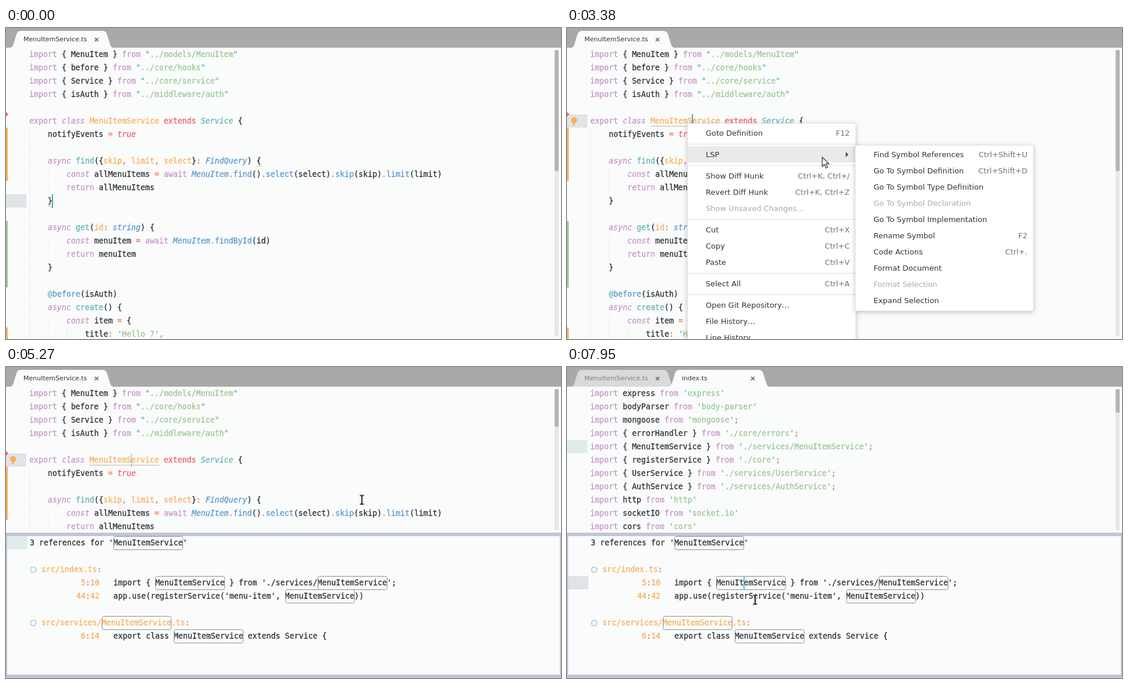
Write an HTML page that moves like this. It is 956 px wide and 537 px high and loops after 8000 ms.

```html
<!DOCTYPE html>
<html lang="en">
<head>
<meta charset="utf-8">
<title>Find symbol references</title>
<style>
  html, body { margin: 0; width: 100%; height: 100%; overflow: hidden; background: #fafbfb; }
  svg { display: block; width: 100%; height: 100%; }
  text { white-space: pre; }
  .code text { font: 13.288px "DejaVu Sans Mono", "Liberation Mono", monospace; font-variant-ligatures: none; stroke-width: .28px; }
  .ui text { font: 13px "DejaVu Sans", sans-serif; fill: #333; }
  .ui .tab { font-size: 11px; }
  .ui .key { fill: #727272; text-anchor: end; }
  .ui .off { fill: #aaa; }
  .menu { filter: drop-shadow(0 2px 4px rgba(0, 0, 0, .22)); }
  .guide { stroke: #d3d6d6; stroke-dasharray: 1 2; }
  .match { fill: none; stroke: #8e8e8e; }
</style>
</head>
<body>
<svg id="stage" viewBox="0 0 956 537"></svg>
<script>
const LOOP = 8000, ROW = 23, BG = '#fafbfb';
const GREY = '#e0e4e7', TINT = '#e0eceb', ORANGE = '#f9ae58';

// Lower-case keys are upright, upper-case keys are italic.
const COLORS = {
  d: '#2b2f33', p: '#c695c6', g: '#99c794', t: '#5fb4b4', b: '#5a98d0',
  o: ORANGE, r: '#ec5f66', e: '#f97b58', c: '#c98465'
};

const imports = (names, path, q, end = '') =>
  `~pimport ~d${names} ~pfrom ~t${q}~g${path}~t${q}~c${end}`;

const serviceCode = [
  imports('{ MenuItem }', '../models/MenuItem', '"'),
  imports('{ before }', '../core/hooks', '"'),
  imports('{ Service }', '../core/service', '"'),
  imports('{ isAuth }', '../middleware/auth', '"'),
  '',
  '~pexport ~Pclass ~oMenuItemService ~rextends ~TService ~d{',
  '    ~dnotifyEvents ~e= ~Rtrue',
  '',
  '    ~Pasync ~tfind~d({~oskip~c, ~olimit~c, ~oselect~d}~c: ~BFindQuery~d) {',
  '        ~Pconst ~dallMenuItems ~e= ~pawait ~BMenuItem~e.~bfind~d()~e.~bselect~d(select)~e.~bskip~d(skip)~e.~blimit~d(limit)',
  '        ~preturn ~dallMenuItems',
  '    ~d}',
  '',
  '    ~Pasync ~tget~d(~oid~c: ~Bstring~d) {',
  '        ~Pconst ~dmenuItem ~e= ~pawait ~BMenuItem~e.~bfindById~d(id)',
  '        ~preturn ~dmenuItem',
  '    ~d}',
  '',
  '    ~t@~bbefore~d(isAuth)',
  '    ~Pasync ~tcreate~d() {',
  '        ~Pconst ~ditem ~e= ~d{',
  "            ~dtitle~c: ~t'~gHello 7~t'~c,"
];

const indexCode = [
  ['express', 'express'], ['bodyParser', 'body-parser'], ['mongoose', 'mongoose', ';'],
  ['{ errorHandler }', './core/errors', ';'],
  ['{ MenuItemService }', './services/MenuItemService', ';'],
  ['{ registerService }', './core', ';'],
  ['{ UserService }', './services/UserService', ';'],
  ['{ AuthService }', './services/AuthService', ';'],
  ['http', 'http'], ['socketIO', 'socket.io'], ['cors', 'cors']
].map(([names, path, end]) => imports(names, path, "'", end));

const rect = (x, y, w, h, fill, extra = '') =>
  `<rect x="${x}" y="${y}" width="${w}" height="${h}" fill="${fill}" ${extra}/>`;
const group = (id, content, cls = '') => `<g id="${id}" class="${cls}">${content}</g>`;

function codeLine(source, x, top) {
  const [lead, ...parts] = source.split(/~(\w)/);
  let spans = '';
  for (let i = 0; i < parts.length; i += 2) {
    const key = parts[i], color = COLORS[key.toLowerCase()];
    const italic = key < 'a' ? ' font-style="italic"' : '';
    spans += `<tspan fill="${color}" stroke="${color}"${italic}>${parts[i + 1]}</tspan>`;
  }
  return `<text x="${x + lead.length * 8}" y="${top + 16}">${spans}</text>`;
}
const codeBlock = lines => lines.map((s, i) => codeLine(s, 40, 34 + i * ROW)).join('');

const guide = (x, y1, y2) => `<path class="guide" d="M${x + .5} ${y1}V${y2}"/>`;
const scrollbar = (id, trackEnd, thumbEnd) => group(id,
  rect(945, 38, 7, trackEnd - 38, '#e6e8e8', 'rx="2"') +
  rect(945, 38, 7, thumbEnd - 38, '#b3b5b5', 'rx="2"'));

function tab(id, x, width, label, fill, ink) {
  const r = x + width;
  return group(id,
    `<path fill="${fill}" d="M${x} 34Q${x + 3} 33 ${x + 4.5} 29L${x + 10} 11Q${x + 12} 5 ${x + 17} 5H${r - 17}Q${r - 12} 5 ${r - 10} 11L${r - 4.5} 29Q${r - 3} 33 ${r} 34"/>` +
    `<text class="tab" x="${x + 22}" y="23" style="fill:${ink}">${label}</text>` +
    `<path stroke="#666" stroke-width="1.7" d="M${r - 31} 17l6 6m0-6l-6 6"/>`, 'ui');
}

function menuItem(x, right, center, label, key = '', off = false) {
  return `<text x="${x}" y="${center + 5}" class="${off ? 'off' : ''}">${label}</text>` +
    `<text class="key" x="${right}" y="${center + 5}">${key}</text>`;
}
const menuBox = (x, y, w, h) => rect(x, y, w, h, '#fff', 'class="menu" stroke="#d5d5d5" stroke-width=".6"');
const hover = (id, x, center, w) => rect(x, center - 14, w, 28, '#ebe9ea', `id="${id}" opacity="0"`);

const mainItems = [
  [181, 'Goto Definition', 'F12'], [218, 'LSP'],
  [255, 'Show Diff Hunk', 'Ctrl+K, Ctrl+/'], [283, 'Revert Diff Hunk', 'Ctrl+K, Ctrl+Z'],
  [311, 'Show Unsaved Changes…', '', true],
  [348, 'Cut', 'Ctrl+X'], [376, 'Copy', 'Ctrl+C'], [404, 'Paste', 'Ctrl+V'],
  [441, 'Select All', 'Ctrl+A'],
  [478, 'Open Git Repository…'], [506, 'File History…'], [534, 'Line History…']
];
const subItems = [
  ['Find Symbol References', 'Ctrl+Shift+U'], ['Go To Symbol Definition', 'Ctrl+Shift+D'],
  ['Go To Symbol Type Definition'], ['Go To Symbol Declaration', '', true],
  ['Go To Symbol Implementation'], ['Rename Symbol', 'F2'], ['Code Actions', 'Ctrl+.'],
  ['Format Document'], ['Format Selection', '', true], ['Expand Selection']
];

const menu = group('menu',
  menuBox(207.5, 164.5, 290, 400) + hover('hoverGoto', 208, 181, 289) + hover('hoverLsp', 208, 218, 289) +
  [200, 237, 330, 423, 460].map(y => rect(208, y, 289, 1, '#dedede')).join('') +
  mainItems.map(item => menuItem(239, 487, ...item)).join('') +
  '<path d="M480 214v9l5-4.5z" fill="#555"/>', 'ui');
const submenu = group('submenu',
  menuBox(496.5, 202.5, 307, 286) + hover('hoverFind', 497, 219, 306) + hover('hoverDef', 497, 247, 306) +
  subItems.map((item, i) => menuItem(528, 793, 218 + i * 28, ...item)).join(''), 'ui');

// Panel rows: [row, x, text]; every mention of the symbol gets a frame.
const SYMBOL = 'MenuItemService';
const panelRows = [
  [0, 41, `~d3 references for '${SYMBOL}'`],
  [2, 61, '~osrc/index.ts~c:'],
  [3, 129, '~o5~c:~o10'],
  [3, 185, `~dimport { ${SYMBOL} } from './services/${SYMBOL}';`],
  [4, 121, '~o44~c:~o42'],
  [4, 185, `~dapp.use(registerService('menu-item', ${SYMBOL}))`],
  [6, 61, `~osrc/services/${SYMBOL}.ts~c:`],
  [7, 129, '~o6~c:~o14'],
  [7, 185, `~dexport class ${SYMBOL} extends Service {`]
];
function panelRow([row, x, source]) {
  const top = 292 + row * ROW, plain = source.replace(/~\w/g, '');
  const frames = [...plain.matchAll(new RegExp(SYMBOL, 'g'))].map(m =>
    `<rect class="match" x="${x + m.index * 8 + .5}" y="${top + .5}" width="119" height="23" rx="3"/>`);
  return codeLine(source, x, top) + frames.join('');
}
const spinner = y =>
  `<circle cx="47" cy="${y}" r="4.7" fill="none" stroke="#2f6f88" stroke-width="1.1" stroke-dasharray="1.4 1.55"/>`;

const panel = group('panel',
  rect(0, 286, 956, 251, '#c2c5d9') + rect(2, 292, 952, 239, BG) +
  rect(2, 292, 35, ROW, TINT, 'id="panelRowIdle"') + rect(2, 361, 35, ROW, GREY, 'id="panelRowActive"') +
  spinner(350) + spinner(442) + panelRows.map(panelRow).join('') +
  rect(304, 361, 2, 24, '#5fb0d0', 'id="caretPanel"'), 'code');

const service = group('service',
  rect(0, 287, 35, ROW, GREY, 'id="rowOld"') + rect(0, 149, 35, ROW, GREY, 'id="rowNew"') +
  rect(0, 172, 3, 92, ORANGE) + rect(0, 333, 3, 115, '#99c794') + rect(0, 517, 3, 20, ORANGE) +
  '<path d="M0 145l4 4-4 4z" fill="#ec5f66"/>' +
  guide(40, 174, 537) + [[241, 287], [356, 402], [494, 537]].map(([a, b]) => guide(72, a + 2, b)).join('') +
  guide(104, 519, 537) + codeBlock(serviceCode) +
  group('braces', rect(432, 238, 8, 1, ORANGE) + rect(72, 307, 8, 1, ORANGE)) +
  rect(144, 169, 120, 1, '#bdb89a', 'id="underline"') +
  group('bulb', `<circle cx="12" cy="159" r="5.2" fill="${ORANGE}"/>` +
    rect(9.5, 162, 5, 3, ORANGE) + rect(10, 166, 4, 2, ORANGE)) +
  rect(79, 287, 2, 24, '#4aa5a8', 'id="caretOld"') + rect(215, 149, 2, 24, '#4aa5a8', 'id="caretNew"'), 'code');

const index = group('index', rect(0, 126, 35, ROW, TINT) + codeBlock(indexCode), 'code');

const ibeam = 'M-3.5 -7.5H-1Q0 -7.5 0 -6.5Q0 -7.5 1 -7.5H3.5M0 -7V7M-3.5 7.5H-1Q0 7.5 0 6.5Q0 7.5 1 7.5H3.5';
const mouse = group('mouse',
  group('ibeam', `<path d="${ibeam}" fill="none" stroke="#fff" stroke-width="3.4"/>` +
    `<path d="${ibeam}" fill="none" stroke="#222" stroke-width="2"/>`) +
  '<path id="arrow" d="M.5 .5V16.5L4.2 13L7 19.2L9.8 18L7 11.9H12z" fill="#fff" stroke="#222" stroke-width="1.2"/>');

document.getElementById('stage').innerHTML =
  rect(0, 0, 956, 537, BG) + service + index +
  scrollbar('barFull', 533, 247) + scrollbar('barSplit', 282, 103) + scrollbar('barIndex', 282, 79) +
  rect(0, 0, 956, 34, '#a8aaa9') +
  tab('tabIdle', 8, 176, 'MenuItemService.ts', '#d9dbda', '#8a7a78') +
  tab('tabService', 8, 176, 'MenuItemService.ts', BG, '#333') +
  tab('tabIndex', 176, 172, 'index.ts', BG, '#333') +
  panel + menu + submenu + mouse;

function play(id, property, table, easing = 'linear') {
  const first = table[0], last = table[table.length - 1];
  const frames = [[0, first[1]], ...table, [LOOP, last[1]]]
    .map(([time, value]) => ({ offset: time / LOOP, [property]: value, easing }));
  document.getElementById(id).animate(frames, { duration: LOOP, iterations: Infinity });
}
const fade = (id, ...table) => play(id, 'opacity', table);
function show(id, from, to = LOOP) {
  const table = [[0, from ? 0 : 1], [from, 1]];
  if (to < LOOP) table.push([to, 0]);
  play(id, 'opacity', table, 'step-end');
}

const OPEN = 2080, CLICK = 4680, RESULTS = 4830, PREVIEW = 6810;

show('service', 0, PREVIEW);
show('index', PREVIEW);
show('rowOld', 0, 910);
show('braces', 0, 910);
show('rowNew', 910);
show('underline', 1240);
show('bulb', 1500);
show('menu', OPEN, CLICK);
show('submenu', 3150, CLICK);
show('panel', RESULTS);
show('panelRowIdle', 0, PREVIEW);
show('panelRowActive', PREVIEW);
show('barFull', 0, RESULTS);
show('barSplit', RESULTS, PREVIEW);
show('barIndex', PREVIEW);
show('tabService', 0, PREVIEW);
show('tabIdle', PREVIEW);
show('tabIndex', 7180);

fade('hoverGoto', [2330, 0], [2430, 1], [2930, 1], [3030, 0]);
fade('hoverLsp', [2930, 0], [3030, 1]);
fade('hoverDef', [3640, 0], [3740, 1], [3850, 1], [3950, 0]);
fade('hoverFind', [3830, 0], [3920, 1]);

// One blink: fade out, stay hidden, fade in, stay visible.
function blink(start, count) {
  const table = [];
  for (let i = 0; i < count; i++) {
    const t = start + i * 1070;
    table.push([t, 1], [t + 310, 0], [t + 490, 0], [t + 800, 1]);
  }
  return table.filter(([t]) => t < LOOP);
}
fade('caretOld', [160, 1], [470, 0], [650, 0], [909, .85], [910, 0]);
fade('caretNew', [909, 0], [910, 1], ...blink(1450, 5));
fade('caretPanel', [PREVIEW - 1, 0], [PREVIEW, 1], ...blink(7180, 1));

show('mouse', 1780);
show('arrow', OPEN, CLICK);
play('ibeam', 'opacity', [[0, 1], [OPEN, 0], [CLICK, 1]], 'step-end');
play('mouse', 'transform', [
  [1780, 236, 171], [2000, 208, 165], [2250, 208, 165], [2500, 262, 180], [2710, 286, 191],
  [2860, 290, 197], [3100, 306, 216], [3300, 400, 219], [3600, 545, 232], [3730, 585, 242],
  [3830, 604, 238], [3930, 611, 227], [4150, 614, 229], [5270, 614, 229], [5460, 435, 280],
  [5550, 309, 327], [5730, 309, 327], [5950, 308, 366], [6480, 304, 374], [6600, 304, 374],
  [6640, 305, 374], [7600, 305, 374], [7900, 324, 402]
].map(([time, x, y]) => [time, `translate(${x}px, ${y}px)`]));
</script>
</body>
</html>
```
